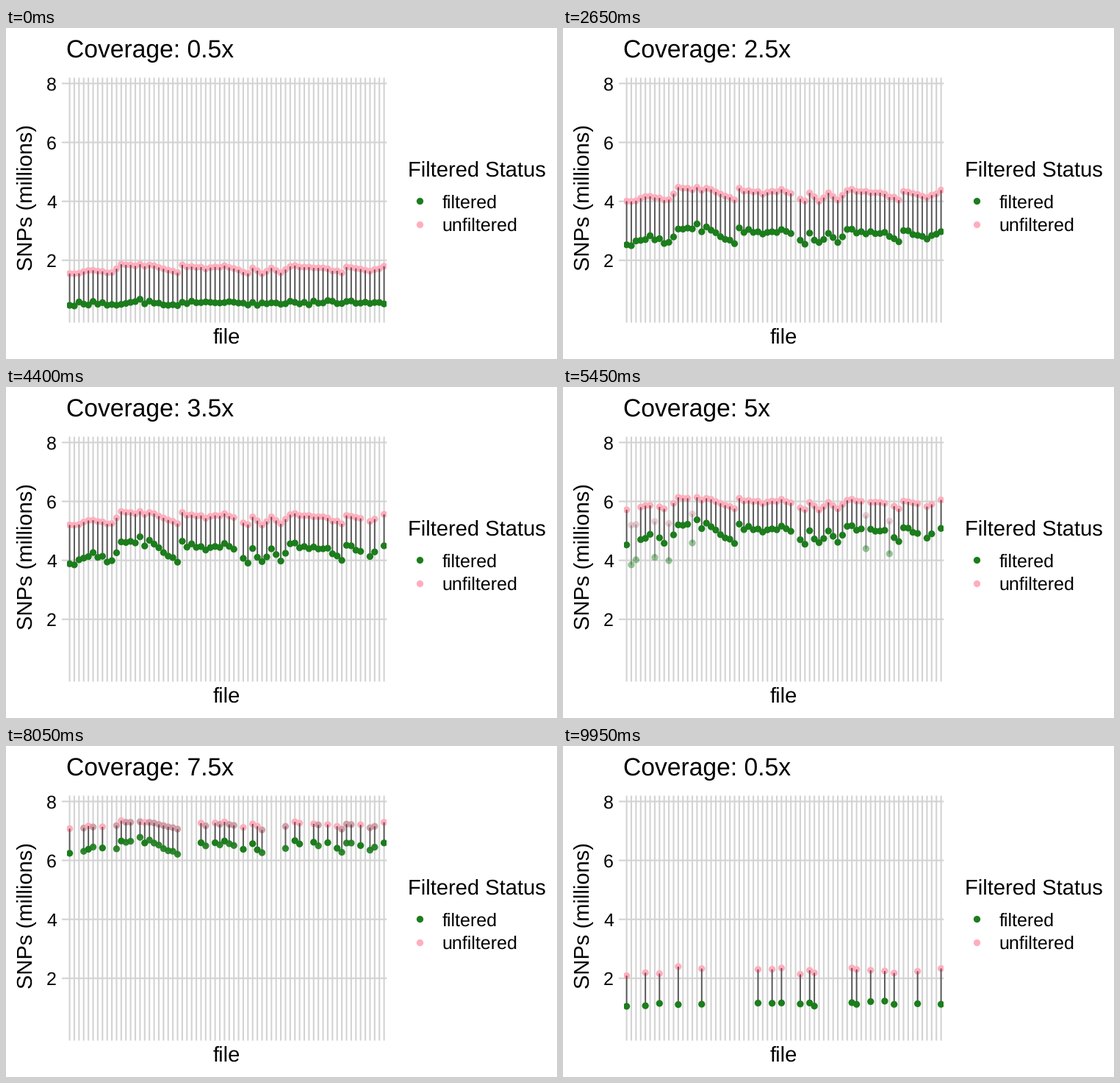
Animation of 750x450 px, one loop 10 s. Source, as a matplotlib script:

```python
import matplotlib.pyplot as plt
import numpy as np
from matplotlib.animation import FuncAnimation
from matplotlib.collections import LineCollection
from matplotlib.colors import to_rgb
from matplotlib.patches import Rectangle

W, H, DPI = 750, 450, 100
PX = 72 / DPI
FRAMES, STEP_MS = 200, 50
FILES = 68
GREEN, PINK, FADING, GRID = "#1c7d1c", "#ffaebd", "#cf97a2", "#d3d3d3"

plt.rcParams["font.family"] = "Liberation Sans"
plt.rcParams["text.hinting"] = "no_hinting"

rng = np.random.default_rng(4)
files = np.arange(FILES)

# Each file's deviation in millions: peaks and dips joined by ramps, plus jitter.
peaks = {0: -.35, 2: -.42, 4: -.05, 9: -.3, 11: .35, 18: .3, 23: -.3, 24: .3,
         29: .1, 33: .25, 38: -.33, 39: .1, 41: -.42, 43: .12, 45: -.29,
         47: .23, 54: .1, 58: -.3, 59: .17, 64: -.17, 67: .2}
profile = np.interp(files, list(peaks), list(peaks.values()))
profile += rng.normal(0, .04, FILES)
jitter = rng.normal(0, .04, FILES)

# Files in the order they drop out as coverage grows.
gaps = [36, 63, 66, 1, 2, 6, 9, 14, 51, 56, 8, *range(24, 28), 30, 38,
        *range(42, 46), 47, 50, 54, 61]
inner = np.setdiff1d(files[1:-1], gaps)
drop_order = np.concatenate([gaps, rng.permutation(inner)])


def state(label, up, up_gain, low, low_gain, dropped):
    shown = ~np.isin(files, drop_order[:dropped])
    return (label, up + up_gain * profile,
            low + low_gain * profile + jitter, shown)


states = [
    state("0.5x", 1.70, .40, 0.54, .10, 0),
    state("1.5x", 3.57, .60, 2.02, .50, 1),
    state("2.5x", 4.61, .60, 3.30, .87, 1),
    state("3.5x", 5.42, .58, 4.29, 1.0, 3),
    state("5x", 6.33, .50, 5.41, .85, 10),
    state("7.5x", 7.17, .35, 6.44, .60, 25),
    state("10x", 7.58, .30, 7.03, .45, 50),
]
PERIOD = FRAMES / len(states)
HOLD = .6 * PERIOD
MOVE = 11

fig = plt.figure(figsize=(W / DPI, H / DPI), dpi=DPI, facecolor="white")
ax = fig.add_axes([0, 0, 1, 1])
ax.set(xlim=(0, W), ylim=(H, 0))
ax.axis("off")


def to_y(value):
    return 395.9 - 40.06 * value


def text(x, y, s, size, **kw):
    return ax.text(x, y, s, fontsize=size * PX, color="black", va="baseline", **kw)


def dots(x, y, color, z):
    return ax.scatter(x, y, s=(9.3 * PX) ** 2, c=color, linewidths=0, zorder=z)


xs = 86.6 + 6.388 * files
grid = dict(color=GRID, lw=2.1 * PX, zorder=1, snap=False)
ax.vlines(xs, 67.5, 400.5, **grid)
for value in (2, 4, 6, 8):
    ax.hlines(to_y(value), 76, 518.3, **grid)
    text(69, to_y(value) + 9, str(value), 25, ha="right")

title = text(82, 39.5, "", 33.6)
text(300, 429, "file", 29.2, ha="center")
text(36, 230.5, "SNPs (millions)", 29.1, ha="center", rotation=90, rotation_mode="anchor")
text(547, 202, "Filtered Status", 29.1)
for y, name, color in ((235.3, "filtered", GREEN), (267.2, "unfiltered", PINK)):
    dots([563], [y], color, 3)
    text(593.5, y + 9, name, 25)

panel = Rectangle((82.7, 67.5), 435.6, 327, transform=ax.transData)
upper = dots(xs, xs, PINK, 3)
links = ax.add_collection(LineCollection([], linewidths=1.9 * PX, zorder=4, snap=False))
lower = dots(xs, xs, GREEN, 5)
for artist in (upper, links, lower):
    artist.set_clip_path(panel)


def rgba(color, alpha):
    return np.column_stack([np.tile(to_rgb(color), (FILES, 1)), alpha])


def update(frame):
    # The first hold starts the loop; each move follows a hold.
    old = max(int((frame - np.floor(HOLD) + .5) // PERIOD), 0)
    start = round(HOLD + old * PERIOD)
    p = np.clip((frame - start) / MOVE, 0, 1)
    label0, up0, low0, on0 = states[old]
    label1, up1, low1, on1 = states[(old + 1) % len(states)]
    leave = on0 & ~on1 & (p > 0)

    # Files in both states travel; leaving ones fade where they stand.
    if p < 1:
        q = np.where(on1, p, 0)
        up, low = up0 + (up1 - up0) * q, low0 + (low1 - low0) * q
        alpha = np.where(leave, 1 - p, on0 & (on1 | (p == 0)))
    else:
        up, low, alpha = up1, low1, on1.astype(float)

    pinks = rgba(PINK, alpha)
    pinks[leave, :3] = to_rgb(FADING)
    top, bottom = to_y(up), to_y(low)
    upper.set_offsets(np.column_stack([xs, top]))
    upper.set_facecolors(pinks)
    lower.set_offsets(np.column_stack([xs, bottom]))
    lower.set_facecolors(rgba(GREEN, alpha))
    links.set_segments([[(x, a), (x, b)] for x, a, b in zip(xs, top, bottom)])
    links.set_color(rgba("black", .58 * alpha))
    title.set_text("Coverage: " + (label1 if p >= .5 else label0))
    return upper, lower, links, title


anim = FuncAnimation(fig, update, frames=FRAMES, interval=STEP_MS, repeat=True)
plt.show()
```
